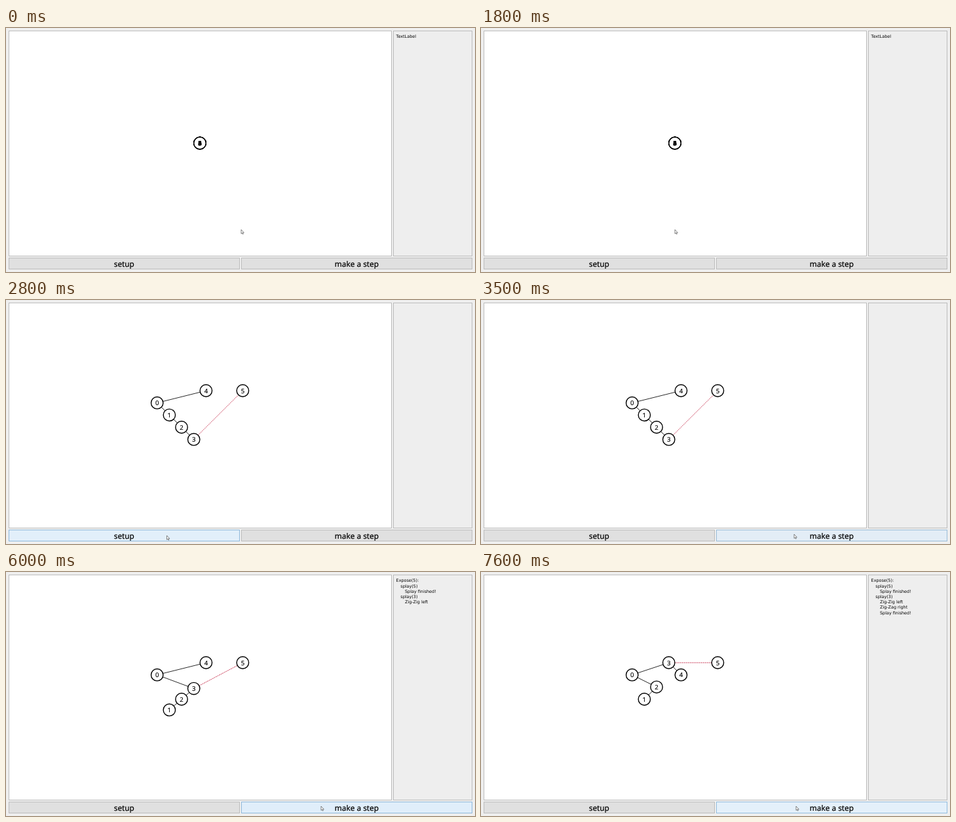
Animation, 716 px wide and 374 px high, one loop 8000 ms. Source, as an HTML page:

```html
<!DOCTYPE html>
<html lang="en">
<head>
<meta charset="utf-8">
<title>Tree steps</title>
<style>
  html, body { margin: 0; width: 100%; height: 100%; overflow: hidden; background: #efefef; }
  svg { display: block; width: 716px; height: 374px; }
  text { text-rendering: geometricPrecision; }
  .panel { stroke: #bcbcbc; }
  .caption { font: 11.8px "Noto Sans", "Open Sans", sans-serif; text-anchor: middle; stroke: #000; stroke-width: .2; }
  .log { font: 6.45px "DejaVu Sans", sans-serif; }
  .digit { font: 9.6px "Noto Sans", "Open Sans", sans-serif; text-anchor: middle; stroke: #000; stroke-width: .15; }
  .node { fill: #fff; stroke: #000; stroke-width: 1.4; }
  .edge { stroke: #111; stroke-width: .9; }
  .link { stroke: #c42a48; stroke-width: .9; stroke-dasharray: 2 .9; }
</style>
</head>
<body>
<svg viewBox="0 0 716 374">
  <rect class="panel" x="4.5" y="4.5" width="584" height="345" fill="#fff"/>
  <rect class="panel" x="591.5" y="4.5" width="120" height="345" fill="#eee"/>
  <rect id="setup" x="4.5" y="352.5" width="352" height="17"/>
  <rect id="step" x="359.5" y="352.5" width="352" height="17"/>
  <text class="caption" x="180.3" y="366">setup</text>
  <text class="caption" x="535.4" y="366">make a step</text>
  <g id="log"></g>
  <g id="edges"></g>
  <g id="nodes"></g>
  <g id="digits"></g>
  <path id="cursor" d="M0 0V6.3L1.5 5L2.4 7.1L3.3 6.7L2.5 4.7H4.3Z" fill="#fff" stroke="#444" stroke-width=".65"/>
</svg>
<script>
const LOOP = 8000, TICK = 100, GLIDE = 213, PRESS = 300;
const GAP = 18.67, IDS = [0, 1, 2, 3, 4, 5];

// Each click may add log lines or a new tree, written as parent-child pairs.
const SETUP = { at: 2580, tree: "40 01 12 23" };
const STEPS = [
  { at: 4100, log: ["Expose(5):", " splay(5)"] },
  { at: 4600, log: ["  Splay finished!"] },
  { at: 5000, log: [" splay(3)"] },
  { at: 5800, log: ["  Zig-Zig left"], tree: "40 03 32 21" },
  { at: 6400, log: ["  Zig-Zag right"], tree: "30 34 02 21" },
  { at: 7100, log: ["  Splay finished!"] }
];

// Pointer: time, x, y
const PATH = [
  [700, 359, 309], [900, 347, 285], [1300, 462, 158], [1400, 483, 171], [1800, 296, 309],
  [2300, 245.5, 361], [3100, 245.5, 361], [3500, 478, 359], [3900, 481, 359]
];

const $ = id => document.getElementById(id);
const clamp = v => Math.max(0, Math.min(1, v));
const ramp = (t, from, to) => clamp((t - from) / (to - from));
const mix = (a, b, k) => a.map((v, i) => v + (b[i] - v) * k);
const show = (el, on) => el.style.display = on ? "" : "none";
const set = (el, attrs) => Object.entries(attrs).forEach(([k, v]) => el.setAttribute(k, v));

function add(parent, tag, attrs, text = "") {
  const el = document.createElementNS("http://www.w3.org/2000/svg", tag);
  set(el, attrs);
  el.textContent = text;
  return $(parent).appendChild(el);
}

const addLine = (text, row) => add("log", "text",
  { class: "log", x: 595.6 + text.search(/\S/) * 6.7, y: 15.3 + row * 8.22 }, text.trim());

// Columns follow the ids, with a gap before the second tree; rows follow the depth.
function layout(pairs) {
  const parent = {};
  pairs.forEach(([p, c]) => parent[c] = p);
  const depth = id => id in parent ? 1 + depth(parent[id]) : 0;
  return IDS.map(id => [230.7 + (id < 5 ? id : id + 2) * GAP, 139 + depth(id) * GAP]);
}

const moves = [];
let last = IDS.map(() => [296, 176.4]);
const stacked = last;
for (const { at, tree } of [SETUP, ...STEPS]) {
  if (!tree) continue;
  const pairs = tree.split(" ");
  const to = layout(pairs);
  moves.push({ at, from: last, to, edges: [...pairs, "35"] });
  last = to;
}

const title = addLine("TextLabel", 0);
const lines = STEPS.flatMap(({ at, log }) => log.map(text => ({ at, text })));
lines.forEach((line, row) => line.el = addLine(line.text, row));
const edges = [0, 1, 2, 3, 4].map(i => add("edges", "line", { class: i < 4 ? "edge" : "link" }));
const nodes = IDS.map(() => add("nodes", "circle", { class: "node", r: 9.2 }));
const digits = IDS.map(id => add("digits", "text", { class: "digit" }, id));

function drawTree(t) {
  const move = moves.findLast(m => t >= m.at);
  const k = move ? ramp(t, move.at, move.at + GLIDE) : 0;
  const spots = move ? move.from.map((p, i) => mix(p, move.to[i], k)) : stacked;
  spots.forEach(([x, y], i) => {
    set(nodes[i], { cx: x, cy: y });
    set(digits[i], { x, y: y + 3.5 });
  });
  edges.forEach((el, i) => {
    show(el, move);
    if (!move) return;
    const [[x1, y1], [x2, y2]] = [...move.edges[i]].map(id => spots[id]);
    set(el, { x1, y1, x2, y2 });
  });
}

function drawButton(el, t, hover, clicks) {
  const click = clicks.findLast(c => t >= c.at);
  const age = click ? (t - click.at) / PRESS : 1;
  const press = Math.min(.5 + age, clamp(1.2 * (1 - age)) ** 2);
  const blend = (idle, over, down) => `rgb(${mix(mix(idle, over, hover), down, press).map(Math.round)})`;
  set(el, {
    fill: blend([224, 224, 224], [228, 240, 250], [204, 228, 247]),
    stroke: blend([188, 188, 188], [146, 188, 222], [118, 164, 206])
  });
}

function drawCursor(t) {
  const i = PATH.findIndex(p => p[0] > t);
  const to = PATH.at(i), from = i > 0 ? PATH[i - 1] : to;
  const [, x, y] = mix(from, to, from === to ? 0 : ramp(t, from[0], to[0]));
  set($("cursor"), { transform: `translate(${x} ${y})` });
}

function draw(now) {
  const t = Math.floor(now % LOOP / TICK) * TICK;
  show(title, t < SETUP.at);
  lines.forEach(({ at, el }) => show(el, t >= at));
  drawTree(t);
  drawButton($("setup"), t, ramp(t, 2000, 2300) - ramp(t, 3200, 3500), [SETUP]);
  drawButton($("step"), t, ramp(t, 3250, 3550), STEPS);
  drawCursor(t);
}

const start = performance.now();
function tick() {
  draw(performance.now() - start);
  requestAnimationFrame(tick);
}
tick();
</script>
</body>
</html>
```
